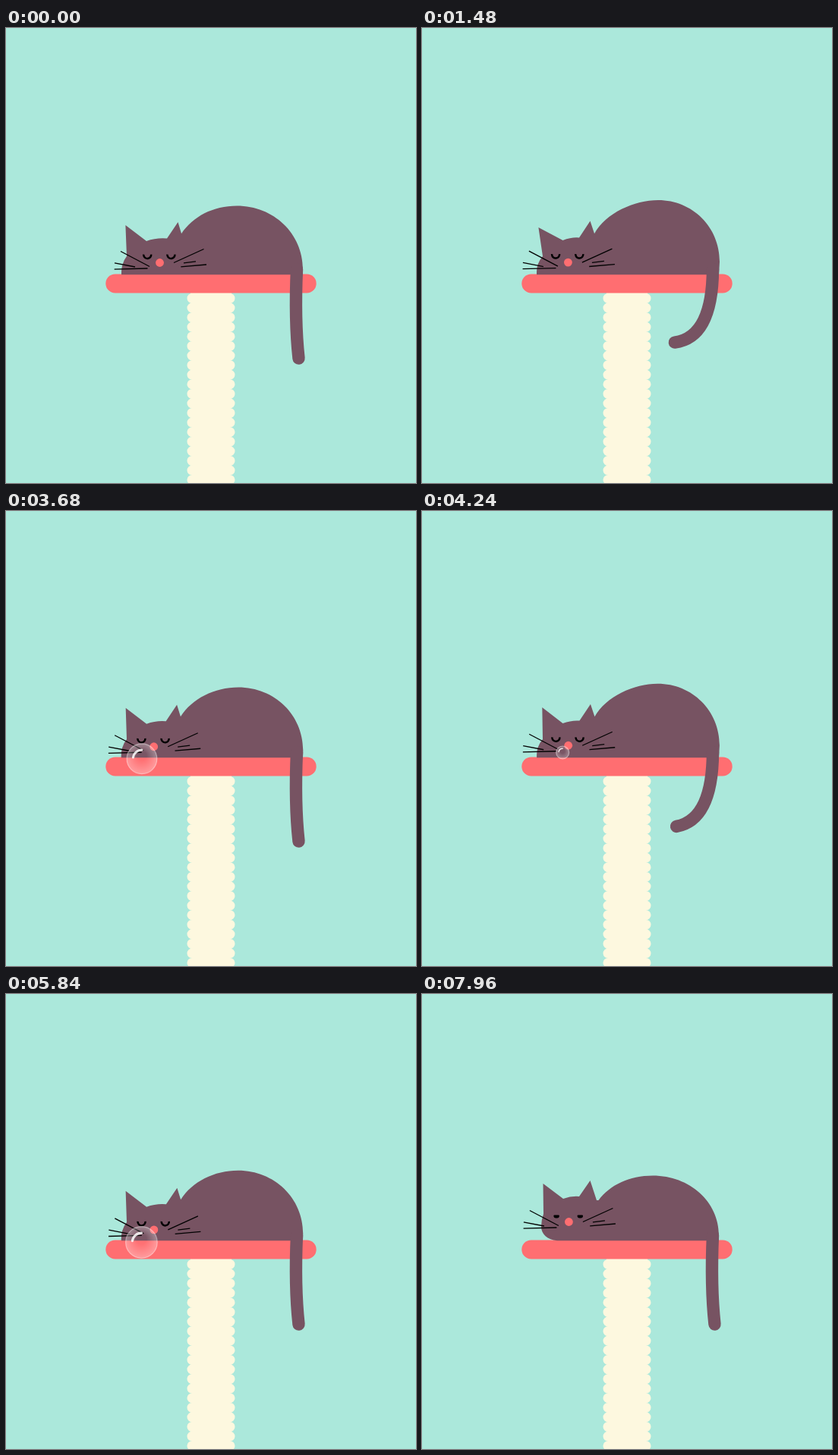
Animation, 540 px wide and 600 px high, one loop 8 s. Source, as an HTML page with a canvas:

```html
<!DOCTYPE html>
<html lang="en">
<head>
<meta charset="utf-8">
<title>Sleeping cat</title>
<style>
  html, body { margin: 0; width: 100%; height: 100%; overflow: hidden; background: #abe8db; }
  canvas { display: block; }
</style>
</head>
<body>
<canvas id="stage" width="540" height="600"></canvas>
<script>
const ctx = document.getElementById('stage').getContext('2d');
const LOOP = 8000, STEP = 40, POP = 6440;
const MINT = '#abe8db', FUR = '#775362', CORAL = '#ff6e71', CREAM = '#fdf8df';

const lerp = (a, b, k) => a + (b - a) * k;

// Sine ease from 0 to 1 between two times.
function ease(t, from, to) {
  const k = Math.min(1, Math.max(0, (t - from) / (to - from)));
  return (1 - Math.cos(Math.PI * k)) / 2;
}

// Rises to 1, holds, then falls back to 0.
const swell = (t, rise, top, fall, end) => ease(t, rise, top) - ease(t, fall, end);

const breath = t => swell(t, 160, 1320, 1560, 3520) + swell(t, 3240, 4480, 4500, 6460);
const curl = t => swell(t, 160, 1280, 1320, 2680) + swell(t, 3680, 4360, 4390, 5480)
  + swell(t, 5980, 6700, 6760, 7980);
const wake = t => ease(t, 6360, 6560);
const jolt = t => swell(t, 6400, 6640, 6720, 7400);
const twitch = t => swell(t, 1320, 1440, 1520, 1680);

// The bubble fills as the cat breathes out and keeps some air afterwards.
const bubbleSize = t => t < 1560 || t >= POP ? 0 : 18 * (1 - breath(t)) + 7.5 * ease(t, 2280, 3200);

function disc(x, y, r) {
  ctx.beginPath();
  ctx.arc(x, y, r, 0, Math.PI * 2);
}

function drawStand() {
  ctx.fillStyle = MINT;
  ctx.fillRect(0, 0, 540, 600);
  ctx.fillStyle = CREAM;
  ctx.fillRect(243, 345, 54, 10);
  ctx.beginPath();
  for (let y = 350; y < 600; y += 12.6) ctx.roundRect(238.5, y, 63, 12.8, 6.3);
  ctx.fill();
  ctx.fillStyle = CORAL;
  ctx.beginPath();
  ctx.roundRect(131.3, 324.4, 277.4, 25.1, 12.5);
  ctx.fill();
}

function drawTail(u) {
  ctx.strokeStyle = FUR;
  ctx.lineWidth = 16.4;
  ctx.lineCap = 'round';
  ctx.beginPath();
  ctx.moveTo(383, 318);
  ctx.quadraticCurveTo(380 + 8 * u - 5.5 * u * u, 385 + 24 * u,
    385.5 - 54.5 * u, 435.5 - 10.6 * u - 11.4 * u * u);
  ctx.stroke();
}

function drawBody(b, w, j, ear) {
  // Blends a sleeping point into its waking place.
  const mix = (x0, y0, x1, y1) => [lerp(x0, x1, w), lerp(y0, y1, w)];
  const [apexX, apexY] = mix(304 + 7 * b, 234.5 - 7.5 * b, 304, 239.5 + 3.5 * j);
  const [rumpX, rumpY] = mix(391 + b, 318 - 10 * b, 391 + j / 2, 318);
  const [neckX, neckY] = mix(231 - 4 * b, 271.3, 232.5, 272);

  ctx.fillStyle = FUR;
  ctx.beginPath();
  // cheek
  ctx.moveTo(...mix(152 - b, 325.2, 178, 325.2));
  ctx.bezierCurveTo(...mix(152 - b, 321, 165, 324.5), ...mix(152 - b, 317, 157, 316), ...mix(153.5 - b, 312, 157, 307));
  ctx.quadraticCurveTo(...mix(155 - b / 2, 306, 157, 298), ...mix(159, 301, 160, 290));
  // ears
  ctx.lineTo(...mix(157.4 + b - 5 * ear, 260 - b + 4 * ear, 159.5 - 4 * j, 250));
  ctx.lineTo(...mix(185 + b / 2, 281 - b, 186, 270 - j));
  ctx.quadraticCurveTo(...mix(198 - b, 276.3 - b * .7, 197, 266 - j), ...mix(212 - 5 * b, 277.5 - b, 207 + j, 267 - j));
  ctx.lineTo(...mix(226.5 - 5 * b, 256 - 1.5 * b, 221.5 + 2.5 * j, 246 - j));
  ctx.lineTo(...mix(231 - 4 * b, 271, 230, 272 - j));
  // back
  ctx.lineTo(neckX, neckY);
  ctx.bezierCurveTo(neckX + 15, lerp(neckY, apexY, .62), apexX - 31, apexY, apexX, apexY);
  ctx.bezierCurveTo(lerp(apexX, rumpX, .56), apexY, rumpX, lerp(rumpY, apexY, .56), rumpX, rumpY);
  ctx.lineTo(391, 325.2);
  ctx.fill();
}

// Inner and outer ends, measured from the nose.
const WHISKERS = [
  [-13.5, 5, -51.5, -15], [-32.5, 5.5, -59.5, .3], [-16, 7.5, -59.8, 8.6],
  [18.5, 0, 58, -18], [31.5, .3, 47.5, -1.7], [27.8, 5.4, 61.5, 2.5]
];

function drawWhiskers(x, y, droop) {
  ctx.strokeStyle = '#000';
  ctx.lineCap = 'butt';
  ctx.lineWidth = 1.3;
  for (const [x0, y0, x1, y1] of WHISKERS) {
    ctx.save();
    ctx.translate(x, y);
    ctx.rotate(Math.sign(x1) * droop * .048);
    ctx.beginPath();
    ctx.moveTo(x0, y0);
    ctx.lineTo(x1, y1);
    ctx.stroke();
    ctx.restore();
  }
}

function drawFace(x, y, awake, droop) {
  ctx.strokeStyle = ctx.fillStyle = '#000';
  ctx.lineCap = 'butt';
  ctx.lineWidth = 2.5;
  for (const eyeX of [x - 16.3, x + 14.9]) {
    ctx.beginPath();
    if (awake) {
      ctx.roundRect(eyeX - 3.7, y - 8.9, 7.4, 3.9, [1, 1, 3, 3]);
      ctx.fill();
    } else {
      ctx.arc(eyeX, y - 10.5, 5, -.1, Math.PI + .1);
      ctx.stroke();
    }
  }
  drawWhiskers(x, y, droop);
  ctx.fillStyle = CORAL;
  disc(x, y, 5.4);
  ctx.fill();
}

function drawBubble(r) {
  if (r < .7) return;
  const x = 190.2 - .55 * r, y = 311.8 + .73 * r;
  const glow = ctx.createRadialGradient(x, y - r * .2, r * .3, x, y, r);
  glow.addColorStop(0, 'rgba(255,255,255,0.02)');
  glow.addColorStop(1, 'rgba(255,255,255,0.32)');
  ctx.fillStyle = glow;
  ctx.strokeStyle = 'rgba(255,255,255,0.42)';
  ctx.lineWidth = 1.1;
  disc(x, y, r - .6);
  ctx.fill();
  ctx.stroke();
  ctx.strokeStyle = 'rgba(255,255,255,0.85)';
  ctx.lineCap = 'round';
  ctx.lineWidth = r * .15;
  ctx.beginPath();
  ctx.arc(x, y, r * .57, Math.PI * 1.05, Math.PI * 1.5);
  ctx.stroke();
}

function drawBurst(age) {
  const k = age / 280;
  if (k < 0 || k >= 1) return;
  const out = 15.5 * Math.sin(k * Math.PI / 2), inner = out - 7 * (1 - k);
  ctx.strokeStyle = '#fff';
  ctx.lineCap = 'round';
  ctx.lineWidth = 1.5;
  ctx.beginPath();
  for (let i = 0; i < 4; i++) {
    const c = Math.cos(i * Math.PI / 2), s = Math.sin(i * Math.PI / 2);
    ctx.moveTo(175.3 + c * inner, 322 + s * inner);
    ctx.lineTo(175.3 + c * out, 322 + s * out);
  }
  ctx.stroke();
}

function draw(t) {
  const b = breath(t), w = wake(t), j = jolt(t), r = bubbleSize(t);
  const turn = 1 - ease(t, 160, 1300);
  const noseX = lerp(192.4 + 3.2 * (1 - b) + 6.9 * turn, 193.4, w);
  const noseY = lerp(309.5 - .4 * b + .11 * Math.max(0, r - 8), 300.5 - j, w);
  drawStand();
  drawBody(b, w, j, twitch(t));
  drawTail(curl(t));
  drawFace(noseX, noseY, t >= POP, j);
  drawBubble(r);
  drawBurst(t - POP);
}

const start = performance.now();
function tick() {
  const t = (performance.now() - start) % LOOP;
  draw(Math.floor(t / STEP) * STEP);
  requestAnimationFrame(tick);
}
tick();
</script>
</body>
</html>
```
